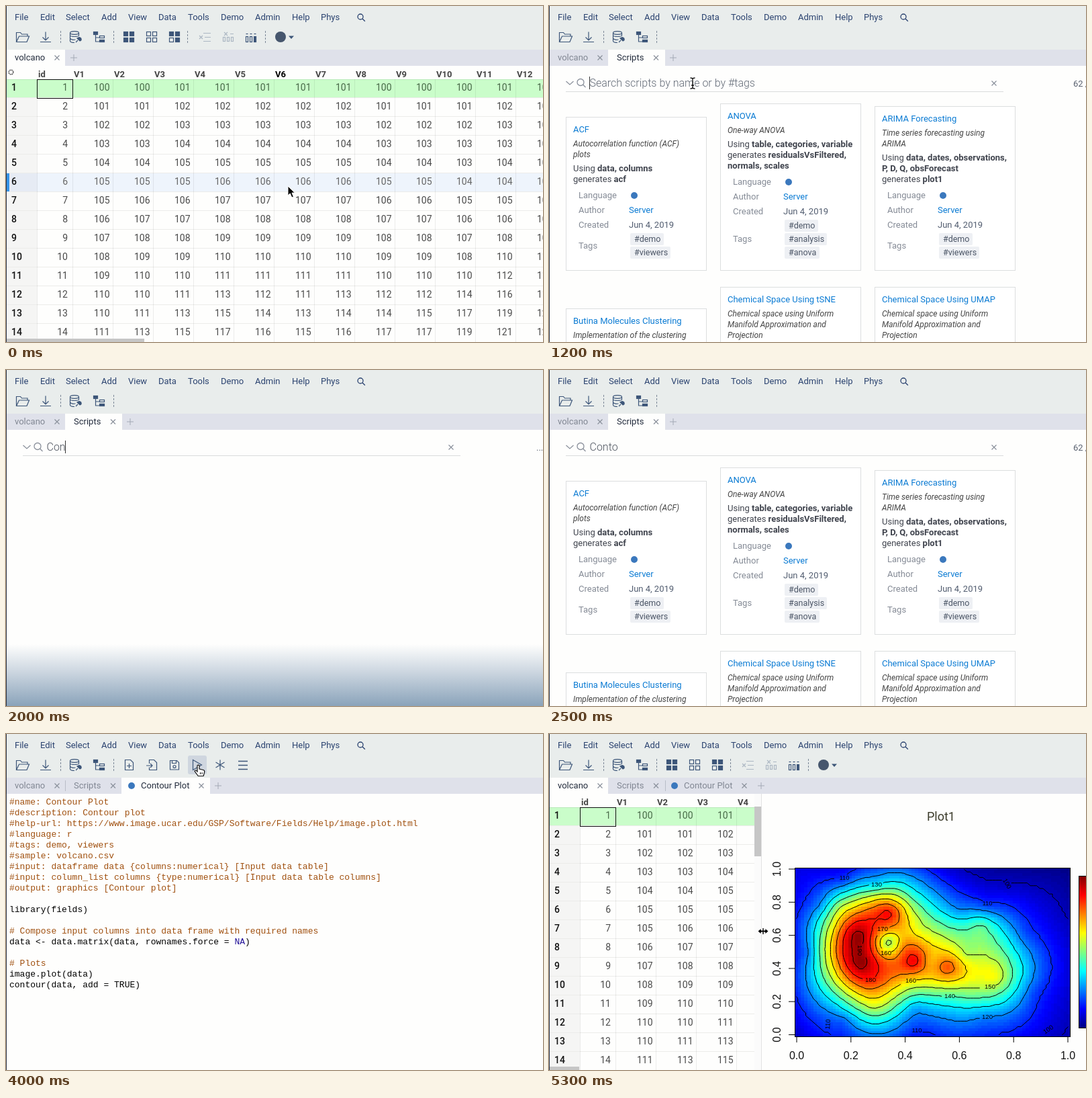
Recreate the animation shown at these times as an HTML page with a canvas. Size 800 px wide and 500 px high, loop 6600 ms.

```html
<!DOCTYPE html>
<html lang="en">
<head>
<meta charset="utf-8">
<title>Contour script</title>
<style>
html, body { margin: 0; width: 100%; height: 100%; overflow: hidden; background: #fefefd; }
#stage { position: relative; width: 800px; height: 500px; overflow: hidden; }
#view { display: block; font-family: Roboto, sans-serif; font-size: 13px; }
#plot { position: absolute; left: 366px; top: 199px; }
.mono { font-family: "Liberation Mono", monospace; }
.sans { font-family: "Liberation Sans", sans-serif; }
.icon { fill: none; stroke: #3d5679; stroke-width: 1.2; }
</style>
</head>
<body>
<div id="stage">
  <svg id="view" width="800" height="500"></svg>
  <canvas id="plot" width="411" height="252"></canvas>
</div>
<script>
const LOOP = 6600;
const NAVY = '#2b4370', SLATE = '#3d5679', BLUE = '#0b7bd3', GRAY = '#8a909b', PAPER = '#fefefd';
const view = document.getElementById('view');
const plot = document.getElementById('plot');
const pen = plot.getContext('2d');

const rect = (x, y, w, h, fill, extra = '') =>
  `<rect x="${x}" y="${y}" width="${w}" height="${h}" fill="${fill}" ${extra}/>`;
const text = (x, y, str, fill = '#444', extra = '') =>
  `<text x="${x}" y="${y}" fill="${fill}" ${extra}>${str}</text>`;
const path = (d, extra = '') => `<path d="${d}" ${extra}/>`;
const dot = (x, y, r, fill) => `<circle cx="${x}" cy="${y}" r="${r}" fill="${fill}"/>`;
const icon = body => `<g class="icon">${body}</g>`;
const cross = (x, y, r = 3.5) =>
  path(`M${x - r} ${y - r}l${2 * r} ${2 * r}m0 ${-2 * r}l${-2 * r} ${2 * r}`, `stroke="${GRAY}" stroke-width="1.2"`);
const lens = (x, y, r, color) =>
  path(`M${x - r} ${y}a${r} ${r} 0 1 0 ${2 * r} 0a${r} ${r} 0 1 0 ${-2 * r} 0M${x + r * .7} ${y + r * .7}l4 4`,
    `fill="none" stroke="${color}" stroke-width="1.3"`);

// Menu bar, toolbar and tabs

const MENU = { File: 13, Edit: 51, Select: 89, Add: 142, View: 182, Data: 227, Tools: 271, Demo: 320, Admin: 371, Help: 426, Phys: 469 };
const separator = x => path(`M${x}.5 37v19`, 'stroke="#7b8797" stroke-dasharray="3 2"');
const squares = (x, filled) => [0, 1, 2, 3].map(i =>
  rect(x + i % 2 * 9 + .5, 38.5 + (i >> 1) * 9, 6, 6, filled(i) ? SLATE : 'none')).join('');

const commonTools = () => icon(
  path('M15.5 53V39.5h6l2 2.5h8.5v3M15.5 53.5l4-8.5h15l-3.5 8.5z') +
  path('M59 38.5v12M54.5 46.5l4.5 4.5 4.5-4.5M51 53.5h16') +
  '<ellipse cx="102" cy="40" rx="6.5" ry="2.3"/>' +
  path('M95.5 40v12c0 1.5 3 2.5 6.5 2.5M95.5 44c1 2 12 2 13 0v-4M95.5 48c1 2 5 2.5 8 2') +
  path('M104 54l3-3M106 48l4 4c3 0 3-5-1-5.5z', `fill="${SLATE}"`) +
  path('M133.5 43v10h6M133.5 47h6') +
  rect(130.5, 38.5, 6, 4, SLATE) + rect(139.5, 44.5, 7, 3, 'none') + rect(139.5, 50.5, 7, 3, SLATE)
) + separator(81) + separator(160);

const gridTools = () => icon(
  squares(175, () => true) + squares(209, () => false) + squares(243, i => i !== 2) +
  `<g opacity=".35">${path('M294 40.5h11M296 46.5h9M294 52.5h11M288 44l5 5m0-5l-5 5')}` +
  [323.5, 329.5, 335.5].map(x => rect(x, 46.5, 3, 6, 'none')).join('') + path('M325 39l5 5m0-5l-5 5M334 41.5h5') + '</g>' +
  [357.5, 363.5, 369.5].map((x, i) => rect(x, 45.5, 3, 8, i === 2 ? SLATE : 'none') + path(`M${x} 41.5h3`)).join('')
) + separator(270) + separator(386) + dot(409, 46, 8, '#46566d') + path('M421 44.5h8l-4 4.5z', `fill="${SLATE}"`);

const scriptTools = hover => (hover ? rect(271, 32, 28, 28, '#cfd6df', 'rx="3"') : '') + icon(
  path('M177.5 38.5h8l4 4v11h-12zM183.5 44v7M180 47.5h7') +
  path('M213.5 44v-5.5h7l4 4v11h-11v-4M209 47h9M215 44l3 3-3 3') +
  path('M244.5 39.5h10l3 3v10.5h-13zM247.5 39.5v4h6v-4') + '<circle cx="251" cy="48.5" r="2"/>' +
  path('M278.5 38.5v15l13-7.5z') +
  path('M319 38.5v15M312.5 42l13 8M312.5 50l13-8') +
  path('M346 40.5h14M346 46.5h14M346 52.5h14', 'stroke-width="1.4"'));

function tabs(active, count) {
  const all = [['volcano', 13, 1, 88, 76], ['Scripts', 101, 88, 173, 159.5], ['Contour Plot', 201, 172, 304, 291]];
  const plus = [101, 185, 316][count - 1];
  return rect(0, 65, 800, 24, '#dfe1ea') + all.slice(0, count).map(([name, x, left, right, close], i) =>
    (i === active ? rect(left, 65, right - left, 24, PAPER) : '') +
    (i < count - 1 && i !== active && i + 1 !== active ? path(`M${right}.5 69v16`, 'stroke="#b9bdc8"') : '') +
    (i === 2 ? dot(187, 77, 5, '#3b78bd') : '') +
    text(x, 81, name, i === active ? '#222b3c' : '#818793') + cross(close, 77)).join('') +
    path(`M${plus - 5} 77h10m-5 -5v10`, 'stroke="#a3a9b5"');
}

function chrome(s) {
  const tools = s.page === 'grid' ? gridTools() : s.page === 'code' ? scriptTools(s.hot) : '';
  return rect(0, 0, 800, 500, PAPER) + rect(0, 0, 800, 65, '#e9edec') +
    Object.entries(MENU).map(([name, x]) => text(x, 21, name, NAVY)).join('') + lens(528, 16, 4, NAVY) +
    commonTools() + tools + tabs({ grid: 0, scripts: 1, code: 2 }[s.page], s.tabs);
}

// Data grid

const UPPER = [0, 0, 1, 1, 1, 1, 1, 0, 0, 0, 1];
const LOWER = [-1, 0, 0, 1, 1, 1, 1, 0, 0, -1, -1];
const SLOPE = {
  12: [-1, -1, 0, 2, 1, 0, 2, 1, 1, 3, 5],
  13: [-2, -1, 1, 3, 2, 1, 2, 2, 3, 5, 7],
  14: [-2, 0, 2, 4, 3, 2, 3, 4, 4, 6, 8]
};
function rowValues(r) {
  const off = [...(SLOPE[r] || (r < 6 ? UPPER : LOWER))];
  if (r === 4 || r === 5) off[10] = 0;
  if (r === 5) off[9] = -1;
  if (r === 6) off[0] = 0;
  if (r > 8 && r < 12) off[10] = r - 9;
  if (r === 11) off[9] = 0;
  off.push(off[10] + 1);
  return off.map(d => 99 + r + d);
}

function grid({ hover, split }) {
  const width = split ? 306 : 800;
  let out = rect(1, 109, 45, 391, '#f5f5f4');
  for (let r = 1; r <= 14; r++) {
    const top = 81 + 28 * r, base = top + 17, current = r === 1;
    if (current) out += rect(1, top, 800, 28, '#cafdca');
    if (r === hover) out += rect(46, top, 754, 28, '#eef4fc') + rect(1, top, 45, 28, '#e6ebf4') + rect(1, top, 4, 28, '#3795e8');
    out += path(`M1 ${top + 27.5}H800`, 'stroke="#ececea"');
    out += text(8, base, r, '#111', 'font-size="14" font-weight="500"');
    const ink = current ? '#486948' : r === hover ? '#666' : '#4a4a4a';
    [r, ...rowValues(r)].forEach((v, c) => {
      out += text(c ? 94.5 + 60 * c : 92, base, v, ink, 'font-size="14" text-anchor="end"');
    });
  }
  for (let c = 0; c <= 12; c++) {
    const x = c ? 41 + 60 * c : 48;
    out += text(x, 106, c ? 'V' + c : 'id', c === 6 && hover ? '#000' : '#444', 'font-weight="700"');
    out += path(`M${39.5 + 60 * (c + 1)} 109V500`, 'stroke="#000" stroke-opacity=".07"');
  }
  out += path('M46.5 109.5V500M1 109.5H800', 'stroke="#000" stroke-opacity=".08"');
  out += rect(46.5, 109.5, 53, 28, 'none', 'stroke="#111"');
  if (!split) out += '<circle cx="7.5" cy="98.5" r="3.3" fill="none" stroke="#444" stroke-width="1.5" stroke-dasharray="1.7 .9"/>';
  out += rect(0, 495, split ? 45 : 206, 5, '#c6c6c6');
  return `<svg width="${width}" height="500">${out}</svg>`;
}

// Script gallery

const CARDS = [
  [25, 165, 'ACF', ['Autocorrelation function (ACF)', 'plots'], ['Using *data, columns*', 'generates *acf*'], ['demo', 'viewers']],
  [255, 145, 'ANOVA', ['One-way ANOVA'], ['Using *table, categories, variable*', 'generates *residualsVsFiltered,*', '*normals, scales*'], ['demo', 'analysis', 'anova']],
  [485, 149, 'ARIMA Forecasting', ['Time series forecasting using', 'ARIMA'], ['Using *data, dates, observations,*', '*P, D, Q, obsForecast*', 'generates *plot1*'], ['demo', 'viewers']],
  [25, 450, 'Butina Molecules Clustering', ['Implementation of the clustering'], [], []],
  ...['tSNE', 'UMAP'].map((kind, i) =>
    [255 + 230 * i, 418, 'Chemical Space Using ' + kind, ['Chemical space using Uniform', 'Manifold Approximation and', 'Projection'], [], []])
];
const FOUND = [[25, 145, 'Contour Plot', ['Contour plot'], ['Using *data, columns*', 'generates *plot*'], ['demo', 'viewers']]];
const CHIP_WIDTH = { demo: 50, viewers: 60, analysis: 63, anova: 52 };
const bold = str => str.replace(/\*(.+?)\*/g, '<tspan font-weight="700">$1</tspan>');

function card([x, y, title, about, usage, tags]) {
  let line = y + 40, bottom = 510;
  let out = text(x + 11, y + 23, title, BLUE);
  for (const str of about) { out += text(x + 11, line + 4, str, '#444', 'font-size="12" font-style="italic"'); line += 16; }
  line += 4;
  for (const str of usage) { out += text(x + 11, line + 5, bold(str), '#3f434d'); line += 16; }
  if (tags.length) {
    line += 8;
    const label = (str, at) => text(x + 19, at + 5, str, '#858b96');
    out += label('Language', line) + dot(x + 102, line + 1, 5, '#3b78bd');
    out += label('Author', line + 22) + text(x + 94, line + 27, 'Server', BLUE);
    out += label('Created', line + 44) + text(x + 94, line + 49, 'Jun 4, 2019', '#525d70');
    out += label('Tags', line + 65 + 10 * (tags.length - 1));
    tags.forEach((tag, i) => {
      const at = line + 66 + 20 * i;
      out += rect(x + 96, at - 9, CHIP_WIDTH[tag], 18, '#eef0f4', 'rx="2"') + text(x + 102, at + 4, '#' + tag, '#4b5566', 'font-size="12.5"');
    });
    bottom = line + 66 + 20 * (tags.length - 1) + 27;
  }
  return rect(x + .5, y + .5, 209, bottom - y - 1, '#fff', 'stroke="#dcdedf"') + out;
}

function gallery({ query = '', caret, list }) {
  pen.font = '300 16px Roboto, sans-serif';
  const end = Math.round(60 + pen.measureText(query).width) + .5;
  const light = 'font-size="16" font-weight="300"';
  let out = path('M25.5 112l5.5 5 5.5-5', `fill="none" stroke="${GRAY}" stroke-width="1.2"`) + lens(47, 113.5, 5, GRAY) +
    text(60.5, 120, query || 'Search scripts by name or by #tags', query ? '#4f5560' : '#626a76', light) +
    path('M25 127.5H677', 'stroke="#d9dbdc"') + cross(663, 115) +
    text(list ? 781 : 790, 120, list === FOUND ? '1 / 1' : list ? '62 / 62' : '...', '#5a6270');
  if (caret) out += path(`M${end} 105v19`, 'stroke="#333"');
  if (list) return out + list.map(card).join('');
  return out + '<linearGradient id="fog" x1="0" y1="0" x2="0" y2="1"><stop offset="0" stop-color="#fefefd"/>' +
    '<stop offset=".45" stop-color="#ccd6e0"/><stop offset="1" stop-color="#8aa3ba"/></linearGradient>' +
    rect(1, 408, 799, 92, 'url(#fog)');
}

// Script editor

const SCRIPT = `#name: Contour Plot
#description: Contour plot
#help-url: https://www.image.ucar.edu/GSP/Software/Fields/Help/image.plot.html
#language: r
#tags: demo, viewers
#sample: volcano.csv
#input: dataframe data {columns:numerical} [Input data table]
#input: column_list columns {type:numerical} [Input data table columns]
#output: graphics [Contour plot]

library(fields)

# Compose input columns into data frame with required names
data <- data.matrix(data, rownames.force = NA)

# Plots
image.plot(data)
contour(data, add = TRUE)`.split('\n');

const editor = ({ caret }) => SCRIPT.map((str, i) => text(5, 105 + 16 * i,
  str.replace('<', '&lt;').replace(/\bNA\b/, '<tspan fill="#219">NA</tspan>'),
  str[0] === '#' ? '#a0500f' : '#000', 'class="mono"')).join('') +
  (caret ? path('M5.5 93v16', 'stroke="#000"') : '');

const status = () => rect(-.5, 484.5, 266, 20, '#f4f5f5', 'stroke="#bbb"') +
  text(4, 499, 'Waiting for dev.datagrok.ai...', '#555', 'font-size="12"');

const shadowBox = (x, y, w, h) => rect(x + 1, y + 2, w, h, '#000', 'opacity=".1"') + rect(x + .5, y + .5, w - 1, h - 1, '#fff', 'stroke="#d5d8dc"');

function menu(level) {
  const list = (x, y, items, hot) => shadowBox(x, y, 176, items.length * 26 + 8) + items.map((name, i) =>
    (i === hot ? rect(x + 1, y + 4 + 26 * i, 174, 26, '#e6edf5') : '') + text(x + 14, y + 22 + 26 * i, name, NAVY)).join('');
  return list(265, 28, ['Console', 'Variables', 'Scripting', 'Data', 'Notebooks', 'Models', 'Settings'], level > 1 ? 2 : -1) +
    (level > 1 ? list(441, 80, ['New Script', 'Browse Scripts', 'Help'], level > 2 ? 1 : -1) : '');
}

const dialog = filled => shadowBox(250, 140, 290, 220) + text(266, 168, 'Contour Plot', NAVY, 'font-size="16"') +
  path('M250 182.5h290', 'stroke="#e2e4e7"') + (filled ?
    text(272, 218, 'Data', GRAY) + text(350, 218, 'volcano', NAVY) + path('M350 224.5h160M350 256.5h160', 'stroke="#d5d8dc"') +
    text(272, 250, 'Columns', GRAY) + text(350, 250, '(62) All', NAVY) : '') +
  text(435, 340, 'OK', BLUE) + text(472, 340, 'CANCEL', BLUE);

// Cursors

const CURSORS = {
  arrow: path('M0 0v14l3.3-3 2.5 6 2.6-1.1-2.5-5.8h4.5z', 'stroke="#fff"'),
  beam: path('M-3.5-8q3 0 3.5 1.5q.5-1.5 3.5-1.5M0-6.5v13M-3.5 8q3 0 3.5-1.5q.5 1.5 3.5 1.5M-2 3h4', 'fill="none" stroke="#111" stroke-width="1.3"'),
  hand: path('M-3-7q1.5-1.5 3 0v5l6 1.5q2 .7 1.7 3l-1.5 6h-8l-5-7q0-2 2-1.3l1.8 1.8z', 'fill="#fff" stroke="#111" stroke-width="1.2"') + path('M1.5 3v3M4 3v3', 'stroke="#111"'),
  resize: path('M-8 0l5-4.5v3h6v-3l5 4.5-5 4.5v-3h-6v3z', 'stroke="#fff"') + path('M0-4.5v9', 'stroke="#111" stroke-width="1.5"')
};
const cursor = ([kind, x, y]) => `<g transform="translate(${x} ${y})">${CURSORS[kind]}</g>`;

// Surface through spot heights: x, y, metres

const SPOTS = [
  [366, 450, 100], [366, 300, 109], [366, 199, 103], [450, 199, 108], [590, 199, 103], [776, 199, 94], [776, 300, 101],
  [776, 450, 98], [600, 448, 112], [548, 447, 109], [486, 448, 119], [415, 450, 109],
  [386, 325, 120], [404, 325, 141], [428, 325, 170], [461, 300, 193], [464, 342, 193],
  [405, 255, 122], [430, 258, 147], [440, 214, 111], [488, 224, 130], [490, 248, 162], [507, 266, 181],
  [505, 311, 148], [484, 311, 173], [528, 313, 167], [500, 336, 172], [505, 288, 170],
  [544, 338, 183], [569, 338, 165], [594, 347, 174], [550, 295, 157], [545, 245, 138],
  [480, 365, 180], [486, 408, 150], [425, 395, 133], [440, 428, 117], [539, 367, 160], [545, 405, 126],
  [597, 390, 140], [650, 421, 120], [665, 362, 156], [622, 325, 149], [645, 285, 140], [610, 262, 121],
  [652, 252, 111], [710, 300, 115], [706, 355, 130], [722, 385, 114]
];
const LABELS = [
  [110, 440, 214], [130, 488, 224], [110, 653, 252], [100, 682, 223, 60], [170, 497, 290], [160, 502, 326], [190, 463, 322, 90],
  [180, 479, 366], [160, 539, 367], [150, 657, 376], [140, 597, 390], [120, 653, 421], [110, 548, 441], [110, 416, 432, -85], [100, 744, 440, -35]
];
const COLS = 87, ROWS = 61, MEAN = 130;
const kernel = (dx, dy) => Math.sqrt(dx * dx + dy * dy + 80);

function solve(m) {
  const n = m.length;
  for (let i = 0; i < n; i++) {
    let p = i;
    for (let r = i + 1; r < n; r++) if (Math.abs(m[r][i]) > Math.abs(m[p][i])) p = r;
    [m[i], m[p]] = [m[p], m[i]];
    for (let r = 0; r < n; r++) {
      if (r === i) continue;
      const f = m[r][i] / m[i][i];
      for (let c = i; c <= n; c++) m[r][c] -= f * m[i][c];
    }
  }
  return m.map((row, i) => row[n] / row[i]);
}

function jet(t) {
  const band = c => Math.round(255 * Math.max(0, Math.min(1, 1.5 - Math.abs(4 * t - c))));
  return `rgb(${band(3)},${band(2)},${band(1)})`;
}

function drawPlot() {
  const weights = solve(SPOTS.map(a => [...SPOTS.map(b => kernel(a[0] - b[0], a[1] - b[1])), a[2] - MEAN]));
  const cw = 410 / COLS, ch = 251 / ROWS;
  const mid = (i, j) => [(i + .5) * cw, (j + .5) * ch];
  const height = (i, j) => {
    const [x, y] = mid(i, j);
    const h = SPOTS.reduce((sum, s, k) => sum + weights[k] * kernel(x + 366 - s[0], y + 199 - s[1]), MEAN);
    return Math.max(94, Math.min(195, Math.round(h)));
  };
  const field = Array.from({ length: COLS }, (_, i) => Array.from({ length: ROWS }, (_, j) => height(i, j)));
  field.forEach((col, i) => col.forEach((h, j) => {
    const x = Math.round(i * cw), y = Math.round(j * ch);
    pen.fillStyle = jet((h - 94) / 101);
    pen.fillRect(x, y, Math.round((i + 1) * cw) - x, Math.round((j + 1) * ch) - y);
  }));
  pen.beginPath();
  for (let level = 100; level <= 190; level += 10) {
    for (let i = 0; i < COLS - 1; i++) for (let j = 0; j < ROWS - 1; j++) {
      const corners = [[i, j], [i + 1, j], [i + 1, j + 1], [i, j + 1]];
      const hits = [];
      corners.forEach(([ai, aj], k) => {
        const [bi, bj] = corners[(k + 1) % 4], a = field[ai][aj], b = field[bi][bj];
        if ((a >= level) === (b >= level)) return;
        const f = (level - a) / (b - a);
        hits.push(mid(ai + f * (bi - ai), aj + f * (bj - aj)));
      });
      for (let k = 0; k + 1 < hits.length; k += 2) {
        const [x, y] = hits[k];
        const labelled = LABELS.some(([v, lx, ly, turn]) => v === level &&
          Math.abs(x + 366 - lx) < (turn ? 7 : 11) && Math.abs(y + 199 - ly) < (turn ? 10 : 7));
        if (!labelled) { pen.moveTo(x, y); pen.lineTo(...hits[k + 1]); }
      }
    }
  }
  pen.strokeStyle = '#000';
  pen.lineWidth = 1;
  pen.stroke();
  pen.strokeRect(.5, .5, 410, 251);
  pen.font = '9.5px "Liberation Sans", sans-serif';
  pen.fillStyle = '#000';
  pen.textAlign = 'center';
  pen.textBaseline = 'middle';
  for (const [v, x, y, turn = 0] of LABELS) {
    pen.save();
    pen.translate(x - 366, y - 199);
    pen.rotate(turn * Math.PI / 180);
    pen.fillText(v, 0, 0);
    pen.restore();
  }
}

function plotFrame() {
  const mark = 'class="sans" font-size="16" text-anchor="middle"';
  let out = rect(306, 89, 10, 411, '#fbfbfb') + rect(306, 108, 10, 74, '#c6c6c6') + path('M316.5 89V500', 'stroke="#e2e2e2"') +
    text(584, 129, 'Plot1', '#3d3d2c', 'font-size="18" text-anchor="middle"');
  for (let i = 0; i <= 5; i++) {
    const x = 369 + 80.8 * i, y = 447.5 - 49.3 * i, label = (i / 5).toFixed(1);
    out += path(`M${x} 450v9M366 ${y}h-9`, 'stroke="#000"') + text(x, 484, label, '#111', mark) +
      text(0, 0, label, '#111', `${mark} transform="translate(345 ${y}) rotate(-90)"`);
  }
  const stops = Array.from({ length: 17 }, (_, i) => `<stop offset="${i / 16}" stop-color="${jet(1 - i / 16)}"/>`).join('');
  return out + `<linearGradient id="scale" x1="0" y1="0" x2="0" y2="1">${stops}</linearGradient>` +
    rect(789.5, 211.5, 20, 226, 'url(#scale)', 'stroke="#000"');
}

// Timeline: each step replaces the one before

const table = { page: 'grid', tabs: 1 };
const scripts = { page: 'scripts', tabs: 2 };
const code = { page: 'code', tabs: 3, caret: true };
const asking = { page: 'code', tabs: 3, dialog: 2 };
const typed = (query, list, caret = true) => ({ ...scripts, query, list, caret });
const STEPS = [
  [0, { ...table, hover: 6, at: ['arrow', 420, 268] }],
  [100, { ...table, hover: 3, at: ['arrow', 384, 182] }],
  [200, { ...table, at: ['arrow', 322, 70] }],
  [300, { ...table, at: ['arrow', 288, 14] }],
  [500, { ...table, menu: 1, at: ['arrow', 288, 16] }],
  [600, { ...table, menu: 2, at: ['arrow', 320, 92] }],
  [700, { ...table, menu: 3, at: ['arrow', 490, 118] }],
  [900, { ...scripts, at: ['arrow', 490, 118] }],
  [1000, { ...scripts, list: CARDS, at: ['arrow', 400, 116] }],
  [1100, { ...scripts, list: CARDS, at: ['beam', 250, 115] }],
  [1200, { ...scripts, list: CARDS, caret: true, at: ['beam', 214, 115] }],
  [1400, { ...scripts, list: CARDS, at: ['beam', 214, 115] }],
  [1600, typed('C', CARDS)],
  [1700, typed('Co', CARDS)],
  [1800, typed('Co')],
  [1900, typed('Con', CARDS)],
  [2000, typed('Con')],
  [2100, typed('Cont', CARDS)],
  [2200, typed('Cont')],
  [2300, typed('Conto', CARDS)],
  [2400, typed('Conto')],
  [2500, typed('Conto', CARDS, false)],
  [2700, typed('Contou', CARDS)],
  [2800, typed('Contour')],
  [2900, { ...typed('Contour', FOUND), at: ['arrow', 174, 190] }],
  [3100, { ...code, status: true, at: ['arrow', 174, 190] }],
  [3200, { ...code, status: true, at: ['beam', 174, 196] }],
  [3400, { ...code, at: ['beam', 184, 178] }],
  [3500, { ...code, at: ['beam', 212, 138] }],
  [3600, { ...code, at: ['arrow', 246, 86] }],
  [3700, { ...code, hot: true, at: ['hand', 280, 58] }],
  [3800, { ...code, hot: true, at: ['hand', 288, 54] }],
  [4000, { ...code, caret: false, hot: true, at: ['hand', 288, 54] }],
  [4200, { ...asking, dialog: 1, hot: true, at: ['hand', 288, 54] }],
  [4300, { ...asking, at: ['arrow', 300, 90] }],
  [4400, { ...asking, at: ['arrow', 340, 180] }],
  [4500, { ...asking, at: ['arrow', 395, 270] }],
  [4600, { ...asking, at: ['arrow', 430, 320] }],
  [4700, { ...asking, at: ['hand', 443, 338] }],
  [4800, { page: 'code', tabs: 3, status: true, at: ['arrow', 443, 334] }],
  [4900, { ...table, tabs: 3, at: ['arrow', 443, 334] }],
  [5300, { ...table, tabs: 3, split: true, at: ['resize', 319, 293.5] }]
];

const PAGES = { grid, scripts: gallery, code: editor };
function render(s) {
  view.innerHTML = chrome(s) + PAGES[s.page](s) + (s.split ? plotFrame() : '') + (s.status ? status() : '') +
    (s.menu ? menu(s.menu) : '') + (s.dialog ? dialog(s.dialog > 1) : '') +
    rect(0, 0, 1, 500, '#273043') + (s.at ? cursor(s.at) : '');
  plot.style.visibility = s.split ? 'visible' : 'hidden';
}

const start = performance.now();
let shown = null;
function tick() {
  const t = (performance.now() - start) % LOOP;
  const step = STEPS.findLast(([at]) => at <= t);
  if (step !== shown) render((shown = step)[1]);
  requestAnimationFrame(tick);
}
drawPlot();
tick();
</script>
</body>
</html>
```
